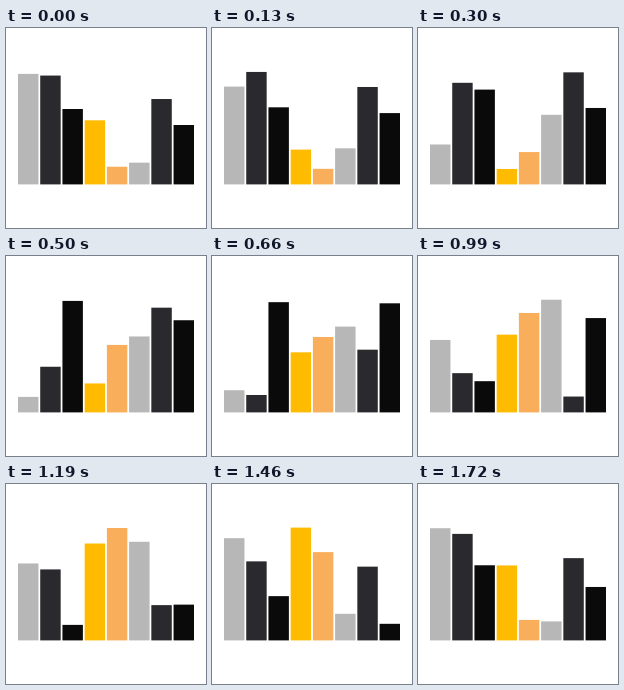
These frames come from a looping animation (200x200 px, 1750 ms). A matplotlib script:

```python
import numpy as np
import matplotlib.pyplot as plt
from matplotlib.animation import FuncAnimation

SIZE, DPI = 200, 100
LOOP_MS, FRAMES = 1750, 53

GRAY, DARK, BLACK = "#b7b7b7", "#2a2a2e", "#0a0a0a"
YELLOW, ORANGE = "#ffbb00", "#f9ae5c"
COLORS = [GRAY, DARK, BLACK, YELLOW, ORANGE, GRAY, DARK, BLACK]
STARTS = np.array([5, 6, 0, 4, 3, 2, 7, 1]) / 8

PITCH = 200 / 9
WIDTH = 0.92 * PITCH
LEFT = 12.0
BASE = 156.4
TOPS = np.array([81.0, 43.6, 141.0, 81.0])  # middle, high, low, middle

# cubic-bezier(0.5, 0, 0.5, 1) as a lookup curve
S = np.linspace(0, 1, 1001)
EASE_X = 1.5 * S * (1 - S) + S**3
EASE_Y = S * S * (3 - 2 * S)


def bar_tops(time):
    phase = (time - STARTS) % 1 * 3
    step = np.minimum(phase.astype(int), 2)
    eased = np.interp(phase - step, EASE_X, EASE_Y)
    return TOPS[step] + (TOPS[step + 1] - TOPS[step]) * eased


fig = plt.figure(figsize=(SIZE / DPI, SIZE / DPI), dpi=DPI, facecolor="white")
ax = fig.add_axes([0, 0, 1, 1])
ax.set(xlim=(0, SIZE), ylim=(SIZE, 0))
ax.axis("off")

xs = LEFT + PITCH * np.arange(len(COLORS))
bars = ax.bar(xs, bar_tops(0) - BASE, WIDTH, bottom=BASE, align="edge",
              color=COLORS, linewidth=0, snap=False)
ax.set(xlim=(0, SIZE), ylim=(SIZE, 0))


def update(frame):
    for bar, top in zip(bars, bar_tops(frame / FRAMES)):
        bar.set_height(top - BASE)
    return list(bars)


anim = FuncAnimation(fig, update, frames=FRAMES, interval=LOOP_MS / FRAMES,
                     repeat=True, repeat_delay=0)
plt.show()
```
